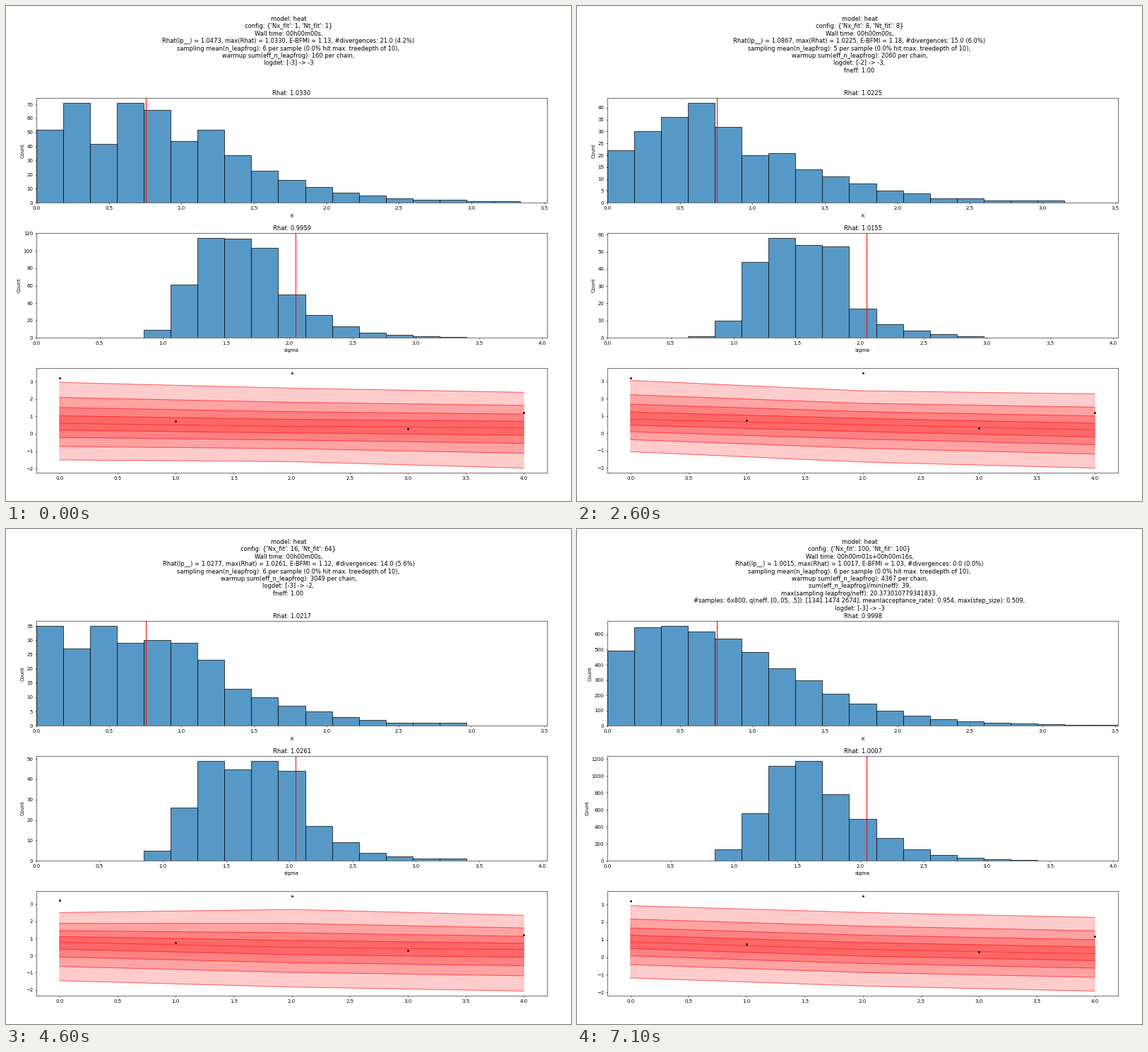
A matplotlib script for the animation above (7600 ms loop, 800 by 700 pixels).

```python
import numpy as np
import matplotlib.pyplot as plt
from matplotlib.animation import FuncAnimation
from matplotlib.colors import to_rgba

W, H, DPI = 800, 700, 50
LEFT, RIGHT = 43, 766
STEP = 100                      # ms per animation frame
BINS = 19
K_MAX, SIGMA_MAX = 3.521, 4.037
K_TRUE, SIGMA_TRUE = 0.755, 2.049
SIGMA_START = 3                 # first filled sigma bin
X = np.arange(5)
DATA = [3.22, 0.74, 3.5, 0.29, 1.21]

CONFIGS = [(1, 1), (1, 2), (2, 2), (2, 4), (4, 4), (4, 8), (8, 8), (8, 16),
           (8, 32), (8, 64), (16, 64), (32, 64), (32, 100), (64, 100),
           (100, 100), (100, 100)]
LAST = len(CONFIGS) - 1

# Deciles of a logistic curve, scaled so that the outer ones are at -1 and 1
DECILES = np.arange(1, 10) / 10
SPREAD = np.log(DECILES / (1 - DECILES)) / np.log(9)


def histogram(bulk, start, total, ratio):
    """Bulk counts followed by a geometric tail holding the rest of the samples."""
    counts = np.zeros(BINS)
    end = start + len(bulk)
    counts[start:end] = bulk
    tail = (total - sum(bulk)) * (1 - ratio) * ratio ** np.arange(BINS - end)
    counts[end:] = np.floor(tail + 0.5)
    return counts


def quantile_bands(low, mid, high):
    """Nine curves through the outer and middle ones, each given at x = 0, 2, 4."""
    low, mid, high = (np.interp(X, [0, 2, 4], c) for c in (low, mid, high))
    s = SPREAD[:, None]
    return mid + np.where(s > 0, s * (high - mid), s * (mid - low))


def fit(total, k, sigma, low, mid, high, **stats):
    return dict(k=histogram(k, 0, total, 0.68),
                sigma=histogram(sigma, SIGMA_START, total, 0.5),
                bands=quantile_bands(low, mid, high), total=total, **stats)


FITS = {
    0: fit(504, [52, 71, 42, 71, 66, 44, 52, 34], [0, 9, 61, 115, 114, 104, 50],
           (-1.5, -1.6, -1.97), (0.6, 0.42, 0.34), (2.95, 2.62, 2.38),
           lp=1.0473, rk=1.0330, rs=0.9959, bfmi=1.13, div=21, leap=6,
           warm=160, det0=-3, det1=-3),
    4: fit(252, [30, 31, 34, 39, 21, 23, 20, 8], [0, 3, 25, 59, 48, 50, 30],
           (-1.4, -1.73, -2.02), (0.9, 0.42, 0.06), (3.18, 2.64, 2.48),
           lp=1.0705, rk=0.9976, rs=1.0427, bfmi=1.15, div=12, leap=8,
           warm=1487, det0=-3, det1=-3),
    6: fit(252, [22, 30, 36, 42, 32, 20, 21, 14], [1, 10, 44, 58, 54, 53, 17],
           (-1.06, -1.66, -2.01), (0.82, 0.5, 0.2), (3.06, 2.46, 2.28),
           lp=1.0867, rk=1.0225, rs=1.0155, bfmi=1.18, div=15, leap=5,
           warm=2060, det0=-2, det1=-3),
    8: fit(252, [19, 26, 38, 41, 38, 17, 25, 12], [0, 10, 31, 55, 55, 42, 21],
           (-1.3, -1.6, -2.1), (0.87, 0.5, 0.1), (2.84, 2.47, 2.3),
           lp=1.0308, rk=1.0214, rs=0.9899, bfmi=1.25, div=14, leap=6,
           warm=2536, det0=-3, det1=-3),
    10: fit(252, [35, 27, 35, 29, 30, 29, 23, 13], [0, 5, 26, 49, 45, 49, 44],
            (-1.47, -1.84, -2.08), (0.79, 0.48, 0.35), (2.52, 2.7, 2.36),
            lp=1.0277, rk=1.0217, rs=1.0261, bfmi=1.12, div=14, leap=6,
            warm=3049, det0=-3, det1=-2),
    12: fit(252, [30, 43, 22, 26, 29, 28, 28, 16], [0, 16, 32, 59, 56, 36, 20],
            (-1.41, -1.54, -2.02), (0.79, 0.52, 0.05), (2.72, 2.69, 2.49),
            lp=1.0588, rk=1.0627, rs=1.0363, bfmi=0.98, div=13, leap=7,
            warm=3545, det0=-3, det1=-2),
    15: fit(4800, [493, 646, 655, 617, 570, 483, 375, 300],
            [4, 134, 559, 1122, 1176, 785, 493],
            (-1.18, -1.64, -1.93), (0.87, 0.45, 0.2), (2.94, 2.55, 2.27),
            lp=1.0015, rk=0.9998, rs=1.0007, bfmi=1.03, div=0, leap=6,
            warm=4367, det0=-3, det1=-3),
}


def get_fit(i):
    """A key fit, or a blend of the key fits around it with 252 samples."""
    if i in FITS:
        return FITS[i]
    lo = max(j for j in FITS if j < i)
    hi = min(j for j in FITS if j > i)
    a, b, t = FITS[lo], FITS[hi], (i - lo) / (hi - lo)
    mixed = {}
    for key in a:
        u, v = a[key], b[key]
        if key in ("k", "sigma", "div", "total"):
            u, v = u * 252 / a["total"], v * 252 / b["total"]
        mixed[key] = (1 - t) * u + t * v
        if key in ("k", "sigma", "div", "leap", "warm", "det0", "det1"):
            mixed[key] = np.floor(mixed[key] + 0.5)
    return mixed


def header(i, f):
    nx, nt = CONFIGS[i]
    last = i == LAST
    wall = "00h00m01s+00h00m16s" if last else "00h00m00s"
    worst = 1.0017 if last else max(f["rk"], f["rs"])
    rate = 100 * f["div"] / f["total"]
    lines = [
        "model: heat",
        f"config: {{'Nx_fit': {nx}, 'Nt_fit': {nt}}}",
        f"Wall time: {wall},",
        f"Rhat(lp__) = {f['lp']:.4f}, max(Rhat) = {worst:.4f}, "
        f"E-BFMI = {f['bfmi']:.2f}, #divergences: {f['div']:.1f} ({rate:.1f}%)",
        f"sampling mean(n_leapfrog): {f['leap']:.0f} per sample "
        "(0.0% hit max. treedepth of 10),",
        f"warmup sum(eff_n_leapfrog): {f['warm']:.0f} per chain,",
    ]
    if last:
        lines += [
            "sum(eff_n_leapfrog)/min(neff): 39,",
            "max(sampling leapfrog/neff): 20.373010779341833,",
            "#samples: 6x800, q(neff, [0,.05, .5]): [1341 1474 2674], "
            "mean(acceptance_rate): 0.954, max(step_size): 0.509,",
        ]
    det = f"logdet: [{f['det0']:.0f}] -> {f['det1']:.0f}"
    lines += [det] if i in (0, LAST) else [det + ",", "fneff: 1.00"]
    return "\n".join(lines)


fig = plt.figure(figsize=(W / DPI, H / DPI), dpi=DPI, facecolor="white")
title = fig.suptitle("")


def panel(top, bottom):
    return fig.add_axes([LEFT / W, 1 - bottom / H, (RIGHT - LEFT) / W,
                         (bottom - top) / H])


def hist_panel(top, bottom, x_max, truth, name):
    ax = panel(top, bottom)
    width = x_max / BINS
    bars = ax.bar(np.arange(BINS) * width, np.ones(BINS), width, align="edge",
                  facecolor=to_rgba("C0", 0.75), edgecolor="black", linewidth=1)
    ax.axvline(truth, color="red")
    ax.set_xlim(0, x_max)
    ax.set_xlabel(name, labelpad=6.5)
    ax.set_ylabel("Count")
    return ax, bars


def set_hist(ax, bars, counts, rhat):
    for bar, n in zip(bars, counts):
        bar.set_height(n)
    ax.set_ylim(0, 1.05 * counts.max())
    ax.set_title(f"Rhat: {rhat:.4f}")


k_panel = hist_panel(130, 278.3, K_MAX, K_TRUE, "K")
s_panel = hist_panel(321, 469.1, SIGMA_MAX, SIGMA_TRUE, "sigma")

band_ax = panel(512, 660.2)
band_ax.set_xlim(-0.2, 4.2)
fills = [band_ax.fill(X, X, color="red", alpha=0.2, linewidth=1)[0]
         for _ in range(4)]
curves = [band_ax.plot(X, X, color="red", alpha=0.5)[0] for _ in DECILES]
band_ax.plot(X, DATA, "k.", zorder=3)


def set_bands(bands):
    for fill, low, high in zip(fills, bands, bands[::-1]):
        fill.set_xy(np.column_stack([np.r_[X, X[::-1]], np.r_[low, high[::-1]]]))
    for curve, y in zip(curves, bands):
        curve.set_ydata(y)
    low, high = bands.min(), max(DATA)
    pad = 0.05 * (high - low)
    band_ax.set_ylim(low - pad, high + pad)


def update(frame):
    # the first fit stays 100 ms, every later one 500 ms
    i = (frame + 4) // 5
    f = get_fit(i)
    title.set_text(header(i, f))
    set_hist(*k_panel, f["k"], f["rk"])
    set_hist(*s_panel, f["sigma"], f["rs"])
    set_bands(f["bands"])


anim = FuncAnimation(fig, update, frames=76, interval=STEP, repeat=True,
                     repeat_delay=0)
plt.show()
```
